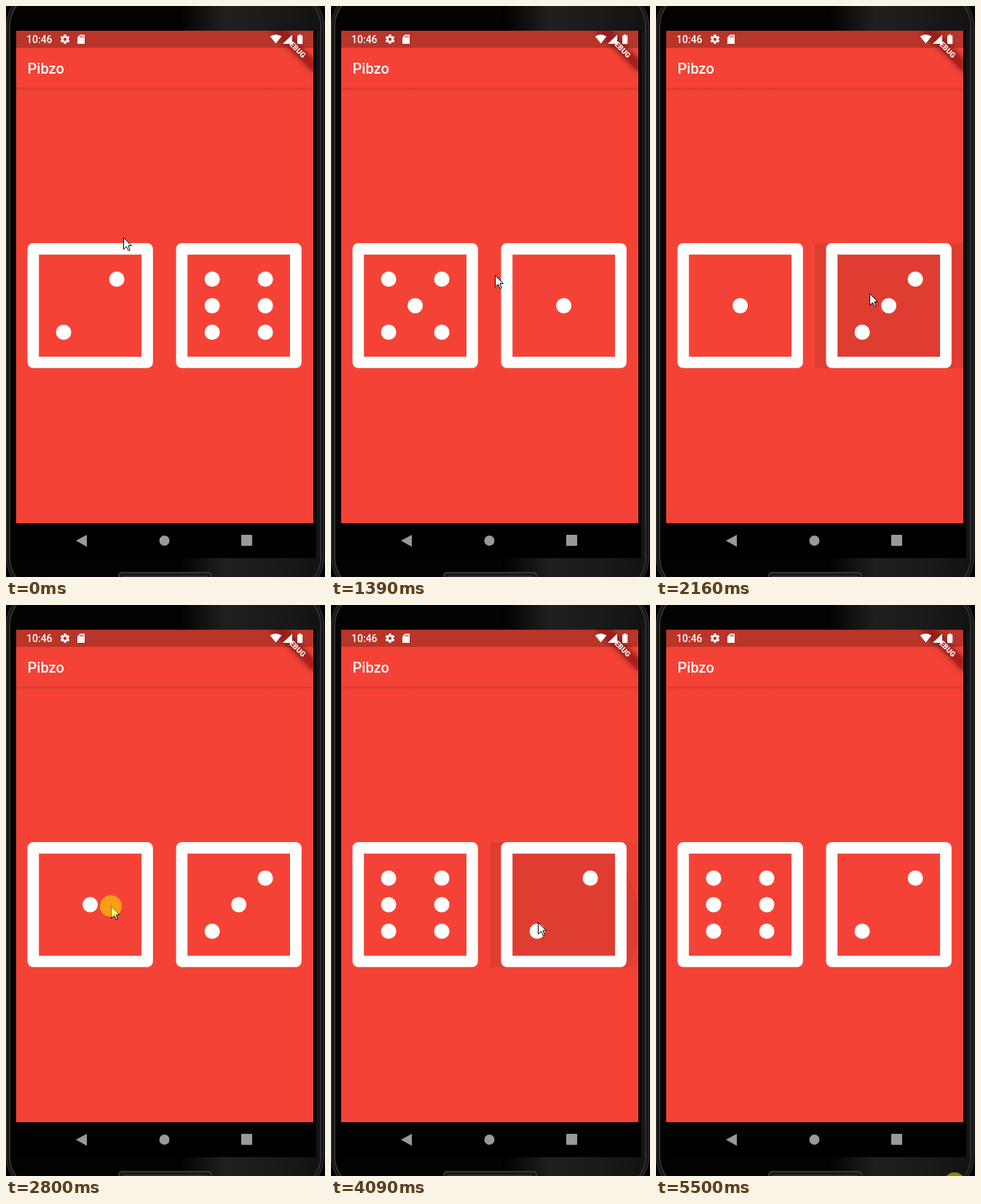
Write an HTML page with a canvas that moves like this. It is 438 px wide and 785 px high and loops after 5750 ms.

```html
<!DOCTYPE html>
<html lang="en">
<head>
<meta charset="utf-8">
<title>Dice roller</title>
<style>
html, body { margin: 0; width: 100%; height: 100%; overflow: hidden; background: #000; }
canvas { display: block; }
</style>
</head>
<body>
<canvas id="stage" width="438" height="785"></canvas>
<script>
const ctx = document.getElementById('stage').getContext('2d');
const LOOP = 5750;
const STEP = 77; // ms between pointer updates
const RED = '#f44336';
const BAR = '#b93429';

const home = { x: 161, y: 318 };
const moves = [
  { from: 0, to: 370, x: 157, y: 346 },
  { from: 1310, to: 1550, x: 293, y: 395 },
  { from: 2320, to: 2480, x: 144, y: 414 },
  { from: 3320, to: 3550, x: 284, y: 436 },
  { from: 4260, to: 4500, x: 361, y: 643 },
  { from: 4500, to: 4880, x: 410, y: 795 }
];

// Each tap on a die rolls both; the last one lands outside the screen
const firstRoll = [2, 6];
const taps = [
  { down: 630, up: 710, die: 0, roll: [5, 1] },
  { down: 1780, up: 1930, die: 1, roll: [1, 3] },
  { down: 2800, up: 2860, die: 0, roll: [3, 3] },
  { down: 3780, up: 3950, die: 1, roll: [6, 2] },
  { down: 5500, up: LOOP }
];

const clamp = v => Math.max(0, Math.min(1, v));
const easeOut = p => 1 - (1 - p) ** 1.7;

function pointerAt(t) {
  let { x, y } = home;
  for (const m of moves) {
    const steps = Math.round((m.to - m.from) / STEP);
    const p = clamp((t - m.from) / (m.to - m.from));
    const e = easeOut(Math.floor(p * steps + 1e-6) / steps);
    x += (m.x - x) * e;
    y += (m.y - y) * e;
  }
  return { x: Math.round(x), y: Math.round(y) };
}

function rect(x, y, w, h, color) {
  ctx.fillStyle = color;
  ctx.fillRect(x, y, w, h);
}

function disc(x, y, r, color) {
  ctx.fillStyle = color;
  ctx.beginPath();
  ctx.arc(x, y, r, 0, Math.PI * 2);
  ctx.fill();
}

function round(x, y, w, h, r, color) {
  ctx.fillStyle = color;
  ctx.beginPath();
  ctx.roundRect(x, y, w, h, r);
  ctx.fill();
}

function poly(points, color) {
  ctx.fillStyle = color;
  ctx.beginPath();
  points.forEach(([x, y]) => ctx.lineTo(x, y));
  ctx.closePath();
  ctx.fill();
}

function text(s, x, y, size, weight) {
  ctx.font = `${weight} ${size}px Roboto, sans-serif`;
  ctx.fillStyle = '#fff';
  ctx.fillText(s, x, y);
}

function gradient(x0, y0, x1, y1, ...colors) {
  const g = ctx.createLinearGradient(x0, y0, x1, y1);
  colors.forEach((c, i) => g.addColorStop(i / (colors.length - 1), c));
  return g;
}

function drawPhone() {
  rect(0, 0, 438, 785, '#000');
  const shell = (inset, color) =>
    round(inset, inset - 24, 437 - 2 * inset, 834 - 2 * inset, 52 - inset, color);
  shell(0, '#2c2c2c');
  shell(1.5, '#141414');
  shell(4, '#303030');
  shell(6, '#020202');
  ctx.save();
  ctx.clip();
  const gloss = gradient(235, 0, 432, 0, '#000', '#202020', '#1a1a1a', '#121212');
  rect(235, 0, 200, 34, gloss);
  rect(235, 759, 200, 26, gloss);
  rect(426, 34, 6, 725, '#151515');
  ctx.restore();
  round(154, 778, 129, 20, 5, '#363636');
  round(156, 780, 125, 18, 4, '#181818');
  round(159, 783, 119, 15, 3, '#303030');
}

function drawStatusIcons() {
  // gear
  ctx.save();
  ctx.translate(81, 45.7);
  for (let i = 0; i < 6; i++) {
    ctx.rotate(Math.PI / 3);
    poly([[-2, -3], [-1.5, -6.4], [1.5, -6.4], [2, -3]], '#fff');
  }
  disc(0, 0, 4.7, '#fff');
  disc(0, 0, 2.2, BAR);
  ctx.restore();

  // memory card
  poly([[101.6, 39.5], [108, 39.5], [108, 52], [98, 52], [98, 43.2]], '#fff');
  for (let x = 101.5; x < 106; x += 2) rect(x, 41, 1.1, 2.5, BAR);

  // wifi, signal, battery
  ctx.fillStyle = '#fff';
  ctx.beginPath();
  ctx.moveTo(370.5, 51.5);
  ctx.lineTo(362.6, 41.8);
  ctx.quadraticCurveTo(370.5, 36.6, 378.4, 41.8);
  ctx.fill();
  poly([[380, 52], [393, 39.5], [393, 52]], '#fff');
  rect(402, 39.3, 3.2, 2, '#fff');
  round(400, 40.4, 7.2, 11.8, 1, '#fff');
}

function drawBanner() {
  ctx.save();
  ctx.beginPath();
  ctx.rect(14, 34, 408, 677);
  ctx.clip();
  ctx.translate(422, 34);
  ctx.rotate(Math.PI / 4);
  ctx.filter = 'blur(4px)';
  rect(-40, 28, 80, 12, 'rgba(0,0,0,.5)');
  ctx.filter = 'none';
  rect(-40, 28, 80, 12, 'rgba(183,28,28,.627)');
  ctx.textAlign = 'center';
  text('DEBUG', 0, 37.4, 10.2, 900);
  ctx.restore();
}

function drawScreen() {
  rect(14, 34, 408, 725, '#000');
  rect(14, 34, 408, 677, RED);
  rect(14, 34, 408, 23.5, BAR);
  rect(14, 112.5, 408, 5, gradient(0, 112.5, 0, 117.5, 'rgba(0,0,0,.14)', 'rgba(0,0,0,.05)', 'rgba(0,0,0,0)'));
  text('10:46', 28, 51, 14, 500);
  text('Pibzo', 29.5, 92.8, 20, 500);
  drawBanner();
  drawStatusIcons();
  poly([[96, 735], [111, 727], [111, 743.5]], '#999');
  disc(217.5, 735, 7, '#999');
  round(323, 727, 15, 15.3, 1, '#999');
}

// Touch feedback: a spreading splash over a short flat highlight
function drawInk(tap, t) {
  const age = t - tap.up;
  if (!tap.roll || age < 0 || age >= 380) return;
  const { x, y } = pointerAt(tap.up);
  const fade = clamp((380 - age) / 150);
  ctx.save();
  ctx.beginPath();
  ctx.rect(14 + tap.die * 204, 326, 204, 172);
  ctx.clip();
  rect(14, 326, 408, 172, `rgba(0,0,0,${0.04 * clamp(age / 120) * fade})`);
  disc(x, y, 20 + 190 * clamp(age / 225), `rgba(0,0,0,${0.042 * fade})`);
  ctx.restore();
}

function drawDie(x, face) {
  ctx.fillStyle = '#fff';
  ctx.beginPath();
  ctx.roundRect(x, 326, 172.3, 171.8, 8);
  ctx.rect(x + 15.7, 341.8, 140.8, 140.5);
  ctx.fill('evenodd');
  const pip = (col, row) => disc(x + 86.1 + col * 36.5, 412 + row * 36.5, 10.5, '#fff');
  if (face % 2) pip(0, 0);
  if (face > 1) { pip(-1, 1); pip(1, -1); }
  if (face > 3) { pip(-1, -1); pip(1, 1); }
  if (face === 6) { pip(-1, 0); pip(1, 0); }
}

function drawPointer(x, y) {
  ctx.save();
  ctx.translate(x + 0.5, y + 0.5);
  poly([[0, 0], [0, 16], [4, 12.2], [6.8, 18], [8.8, 17], [6.4, 11.3], [11, 11]], '#fff');
  ctx.strokeStyle = '#000';
  ctx.lineWidth = 1;
  ctx.lineJoin = 'round';
  ctx.stroke();
  ctx.restore();
}

function draw(t) {
  drawPhone();
  drawScreen();
  taps.forEach(tap => drawInk(tap, t));
  const last = taps.filter(tap => tap.up <= t).pop();
  const [left, right] = last ? last.roll : firstRoll;
  drawDie(29.5, left);
  drawDie(233.5, right);
  const { x, y } = pointerAt(t);
  drawPointer(x, y);
  const pressed = taps.some(tap => t >= tap.down && t < tap.up);
  if (pressed) disc(x, y, 15, 'rgba(255,240,0,.52)');
}

const start = performance.now();
function tick() {
  draw((performance.now() - start) % LOOP);
  requestAnimationFrame(tick);
}
tick();
</script>
</body>
</html>
```
